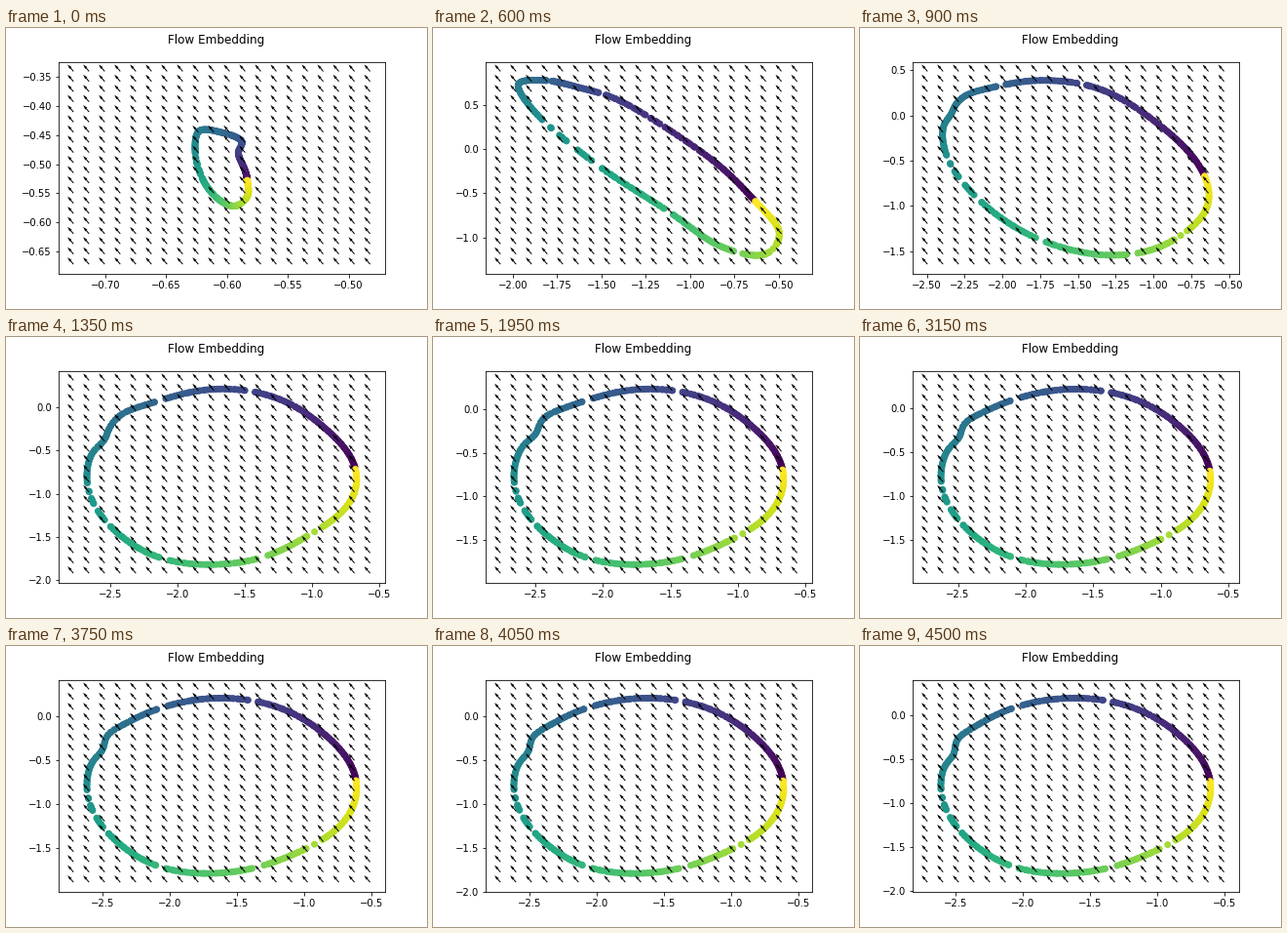
Animation, 432 px wide and 288 px high, one loop 4650 ms. Source, as a matplotlib script:

```python
import numpy as np
import matplotlib.pyplot as plt
from matplotlib.animation import FuncAnimation

STEPS, STEP_MS = 31, 150
GRID = 20
GROW, UNFOLD, ROUND, LAST = 1, 4, 9, 30

# Knots of the two early outlines, evenly spaced in phase (y down)
BUD = [(247.5, 156), (245, 145), (238.5, 128), (241.5, 114.5), (223, 106),
       (199, 104), (195, 128), (202, 154), (214, 172), (227, 181.5),
       (238, 182.5), (248, 172)]
LEAF = [(331, 177), (284, 133), (200, 79), (148, 61), (112, 54.2), (87.5, 60),
        (113, 95), (174, 144), (241, 187), (293, 222), (339, 232), (356, 209)]

# Extent of the points: x min, x max, y min, y max
BUD_BOX = (-0.6263, -0.5824, -0.5720, -0.4404)
LEAF_BOX = (-1.9702, -0.4979, -1.2040, 0.7846)
RING_STEPS = (ROUND, 13, 17, 25, LAST)
RING_BOXES = np.array([(-2.674, -0.668, -1.821, 0.211),
                       (-2.658, -0.664, -1.7865, 0.232),
                       (-2.635, -0.653, -1.780, 0.2305),
                       (-2.616, -0.610, -1.788, 0.206),
                       (-2.609, -0.603, -1.801, 0.2014)])

GAPS = (0.203, 0.314, 0.505, 0.52, 0.545, 0.575, 0.67, 0.785, 0.858, 0.872)
GAP_WIDTH = 0.010


def sample_phases(n=360):
    rng = np.random.default_rng(4)
    u = (np.arange(n) + rng.random(n)) / n
    far = [abs(u - g) > GAP_WIDTH / 2 for g in GAPS]
    return u[np.all(far, axis=0)]


def spline(knots):
    """Periodic Catmull-Rom curve, returned with y up."""
    p = np.array(knots) * (1, -1)
    n = len(p)
    i = np.floor(phase * n).astype(int)
    t = (phase * n - i)[:, None]
    a, b, c, d = (p[(i + k) % n] for k in (-1, 0, 1, 2))
    return b + 0.5 * t * (c - a + t * (2 * a - 5 * b + 4 * c - d
                                       + t * (3 * (b - c) + d - a)))


def ring(step):
    """Unit circle with soft dents; its upper-left corner slides downwards."""
    age = (step - ROUND) / (LAST - ROUND)
    rough = np.exp(-(step - ROUND) / 3)
    corner = 136 + 13 * age
    dents = [(37, -0.045 - 0.023 * rough, 28),
             (115, -0.02 * (1 - age), 15),
             (corner, 0.028, 9),
             (corner + 9 + 10 * rough, -0.035, 7),
             (245, 0.04, 22),
             (304 + 8 * rough, -0.05 - 0.023 * rough, 25)]
    angle = 360 * phase + 5 - 2 * age
    r = 1.0
    for centre, depth, width in dents:
        off = (angle - centre + 180) % 360 - 180
        r = r + depth * np.exp(-(off / width) ** 2)
    a = np.radians(angle)
    return np.column_stack([r * np.cos(a), r * np.sin(a)])


def place(curve, box):
    low, high = np.array(box[::2]), np.array(box[1::2])
    return low + (curve - curve.min(axis=0)) / np.ptp(curve, axis=0) * (high - low)


def ring_at(step):
    box = [np.interp(step, RING_STEPS, side) for side in RING_BOXES.T]
    return place(ring(step), box)


def mix(a, b, w):
    return a * (1 - w) + b * w


def points_at(step):
    if step >= ROUND:
        return ring_at(step)
    leaf = place(spline(LEAF), LEAF_BOX)
    if step >= UNFOLD:
        t = (step - UNFOLD) / (ROUND - UNFOLD)
        return mix(leaf, ring_at(ROUND), 1 - (1 - t) ** 2)
    t = max(0, step - GROW) / (UNFOLD - GROW)
    return mix(place(spline(BUD), BUD_BOX), leaf, t ** 1.5)


phase = sample_phases()

plt.rcParams.update({"font.family": "DejaVu Sans", "font.size": 10})
fig = plt.figure(figsize=(6, 4), dpi=72, facecolor="white")
fig.subplots_adjust(left=0.125, right=0.9, bottom=0.125, top=0.88)
fig.suptitle("Flow Embedding", fontsize=12)
ax = fig.add_subplot()


def draw(step):
    ax.clear()
    pts = points_at(step)
    low, high = pts.min(axis=0) - 0.1, pts.max(axis=0) + 0.1
    pad = 0.05 * (high - low)
    ax.scatter(*pts.T, c=phase, cmap="viridis", vmin=0, vmax=1)
    gx, gy = np.meshgrid(*np.linspace(low, high, GRID).T)
    ax.quiver(gx, gy, np.full_like(gx, -0.65), np.full_like(gy, 0.76))
    (x0, y0), (x1, y1) = low - pad, high + pad
    ax.set(xlim=(x0, x1), ylim=(y0, y1))
    return []


anim = FuncAnimation(fig, draw, frames=STEPS, interval=STEP_MS,
                     init_func=lambda: draw(0), repeat=True, repeat_delay=0)
plt.show()
```
